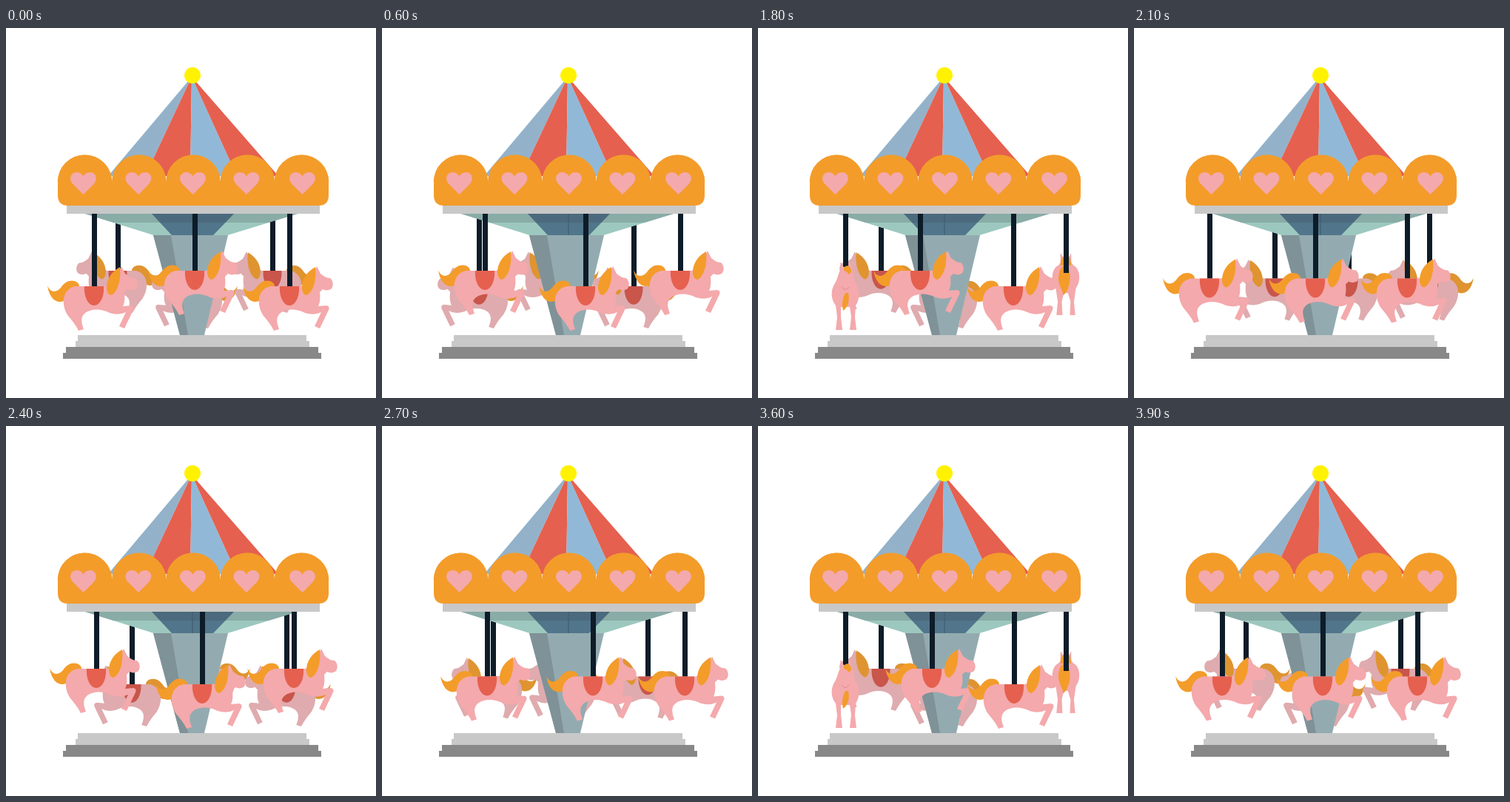
Animation, 500 px wide and 500 px high, one loop 4.2 s. Source, as an HTML page:

```html
<!DOCTYPE html>
<html lang="en">
<head>
<meta charset="utf-8">
<title>Carousel</title>
<style>
  html, body { margin: 0; width: 100%; height: 100%; overflow: hidden; background: #fff; }
  svg { display: block; width: 100vw; height: 100vh; }
  .near { --skin: #f4a9ac; --hair: #f39c2a; --seat: #e5604f; }
  .far { --skin: #dfabae; --hair: #df9430; --seat: #c9554b; }
  .skin { fill: var(--skin); }
  .hair { fill: var(--hair); }
  .seat { fill: var(--seat); }
  .pole { fill: #0d1c28; }
</style>
</head>
<body>
<svg viewBox="0 0 500 500">
  <defs>
    <!-- Side view: origin at the top middle of the saddle -->
    <g id="side">
      <path class="hair" d="M-63-1C-59 9-51 9-45 2C-40-6-33-9-26-7C-20-5-18 1-22 5L-33 11C-38 25-59 27-63-1Z"/>
      <path class="skin" d="M-26 0H15C23-3 28-10 32-18L37-27L42-17C46-14 50-11 55-11C59-8 60-1 57 3C54 6 48 6 45 4L41 8C42 18 41 23 39 27L50 26Q55 27 53 32L41 57L34 54L43 35Q33 40 21 36C10 30-4 30-12 36C-18 41-18 47-14 58L-21 60C-25 52-30 46-35 40C-44 27-45 5-26 0Z"/>
      <path class="hair" d="M35-26C24-20 17-10 17 2C17 8 20 12 23 12C30 9 37-4 35-26Z"/>
      <path class="seat" d="M-13 0H13C14 14 8 26 0 26S-14 14-13 0Z"/>
    </g>
    <!-- Front and rear views: origin between the hooves -->
    <g id="front">
      <path class="skin" d="M-6-82L-7-92L-2-85H3L8-92L9-81C12-76 11-70 14-63C20-54 20-42 14-33L13-17L15 0H6L8-18L6-31H-6L-6-18L-4 0H-13L-11-17L-13-33C-20-42-20-54-14-63C-10-70-10-76-6-82Z"/>
      <path class="hair" d="M-2-84C2-89 8-87 8-78L4-75C3-79 1-79-2-80Z"/>
      <path class="hair" d="M0-50H4C6-40 4-31-3-26C-5-35-4-42 0-50Z"/>
      <path d="M-9-61C-4-63 5-63 9-61C7-50-7-50-9-61Z" fill="#f4a9ac"/>
      <path d="M-5-58Q0-51 5-58" fill="none" stroke="#e58a90"/>
    </g>
    <g id="rear">
      <path class="skin" d="M-8-80L-8-92L-3-85H4L8-92L8-79C10-73 13-74 16-70C22-62 21-48 15-40L12-20L14 0H6L7-20L3-33H-3L-6-20L-5 0H-14L-12-20L-15-40C-21-48-22-62-16-70C-13-74-9-73-8-80Z"/>
      <path class="hair" d="M-7-82C-3-91 5-91 7-82L8-74H-8Z"/>
      <path class="hair" d="M-2-74C5-72 7-64 6-52C5-42 1-33-4-29C-4-36-11-44-11-54C-11-65-7-72-2-74Z"/>
    </g>
    <path id="heart" fill="#f4a9ac" d="M0 225L-14 211C-21 203-16 195-9 195C-4 195-1 198 0 201C1 198 4 195 9 195C16 195 21 203 14 211Z"/>
    <clipPath id="roof"><path d="M103 250H398L300 280H199Z"/></clipPath>
  </defs>

  <rect width="500" height="500" fill="#fff"/>
  <path d="M97 415H406V423H410V431H94V423H97Z" fill="#c8c8c8"/>
  <path d="M81 431H422V439H426V447H77V439H81Z" fill="#888"/>

  <g id="far" class="far"></g>

  <g clip-path="url(#roof)">
    <path d="M103 250H398L300 280H199Z" fill="#9dc8bf"/>
    <path d="M196 250H309L280 280H224Z" fill="#51758b"/>
    <path d="M103 250H398V263H103Z" fill="#3b3f46" opacity=".2"/>
    <path d="M252 250V280" stroke="#3d5a6d"/>
  </g>
  <path d="M199 280H300L268 415H235Z" fill="#93abb0"/>
  <path d="M199 280H223L246 415H235Z" fill="#7f9297"/>

  <g id="near" class="near"></g>

  <path d="M251 66L138 200H188Z" fill="#93b2ca"/>
  <path d="M251 66L188 200H249Z" fill="#e5604f"/>
  <path d="M251 66L249 200H312Z" fill="#91b9d7"/>
  <path d="M251 66L312 200H368Z" fill="#e5604f"/>
  <circle cx="252" cy="64" r="11" fill="#fff200"/>
  <rect x="82" y="239" width="342" height="12" fill="#c8c8c8"/>
  <path d="M70 207H436V226Q436 240 422 240H84Q70 240 70 226Z" fill="#f39c2a"/>
  <g id="scallops" fill="#f39c2a"></g>
</svg>
<script>
  const STEP = 300, COUNT = 14;
  const el = id => document.getElementById(id);

  // Each phase places the horses; "lag" shifts the bobbing of near and far ones.
  const phases = [
    { at: 0, near: [119, 255, 383], far: [151, 253, 360], step: 10, lag: [0, 0] },
    { at: 4, near: [179, 305], far: [206, 297], step: 20, lag: [0, 0], turn: [394, 406] },
    { at: 7, near: [102, 245, 369], far: [190, 290, 399], step: 20, lag: [1, 1] },
    { at: 10, near: [195, 306], far: [206, 297], step: 20, lag: [0, 0], turn: [387, 404] },
    { at: 13, near: [119, 255, 383], far: [151, 253, 360], step: 0, lag: [1, 0] }
  ];

  const pole = (x, end) =>
    `<rect class="pole" x="${x - 3}" y="250" width="7" height="${end - 250}"/>`;
  const shape = (id, x, y, sx, sy) =>
    `<use href="#${id}" transform="translate(${x} ${y}) scale(${sx} ${sy})"/>`;
  const side = (x, y, size) =>
    pole(x, y + 1) + shape("side", x, y, size, Math.abs(size));

  // A negative size faces the horse to the left.
  function row(xs, shift, bob, size) {
    return xs.map((x, i) =>
      side(x + shift, 338.5 + 10.5 * bob * (i % 2 ? -1 : 1), size)).join("");
  }

  function turning([frontY, rearY], j) {
    const fy = frontY + (408 - frontY) * j / 2, fs = 0.95 + 0.025 * j;
    const ry = rearY + (388 - rearY) * j / 2, rs = 1 - 0.045 * j;
    const fx = 98 + 10 * j, rx = 396 + 10 * j;
    return pole(fx, fy - 82 * fs) + shape("front", fx, fy, fs, fs) +
      shape("rear", rx, ry, rs, rs) + pole(rx, 331);
  }

  function draw(k) {
    const p = phases.filter(q => q.at <= k).pop();
    const j = k - p.at;
    const [near, far] = p.lag.map(l => Math.cos(Math.PI * (j + l) / 2));
    el("far").innerHTML = row(p.far, -p.step * j, p.turn ? far : -far, -0.95);
    el("near").innerHTML = (p.turn ? turning(p.turn, j) : "") +
      row(p.near, p.step * j, near, 1);
  }

  const spots = [106.5, 179.8, 253, 326.3, 399.5];
  const hearts = [104.5, 179, 252.5, 325, 400.5];
  el("scallops").innerHTML =
    spots.map(x => `<path d="M${x - 36.8} 208a36.8 36.8 0 0 1 73.6 0z"/>`).join("") +
    hearts.map(x => `<use href="#heart" x="${x}"/>`).join("");

  let shown = 0;
  const start = performance.now();
  function tick(now) {
    const k = Math.floor(Math.max(0, now - start) / STEP) % COUNT;
    if (k !== shown) draw(shown = k);
    requestAnimationFrame(tick);
  }
  draw(0);
  requestAnimationFrame(tick);
</script>
</body>
</html>
```
